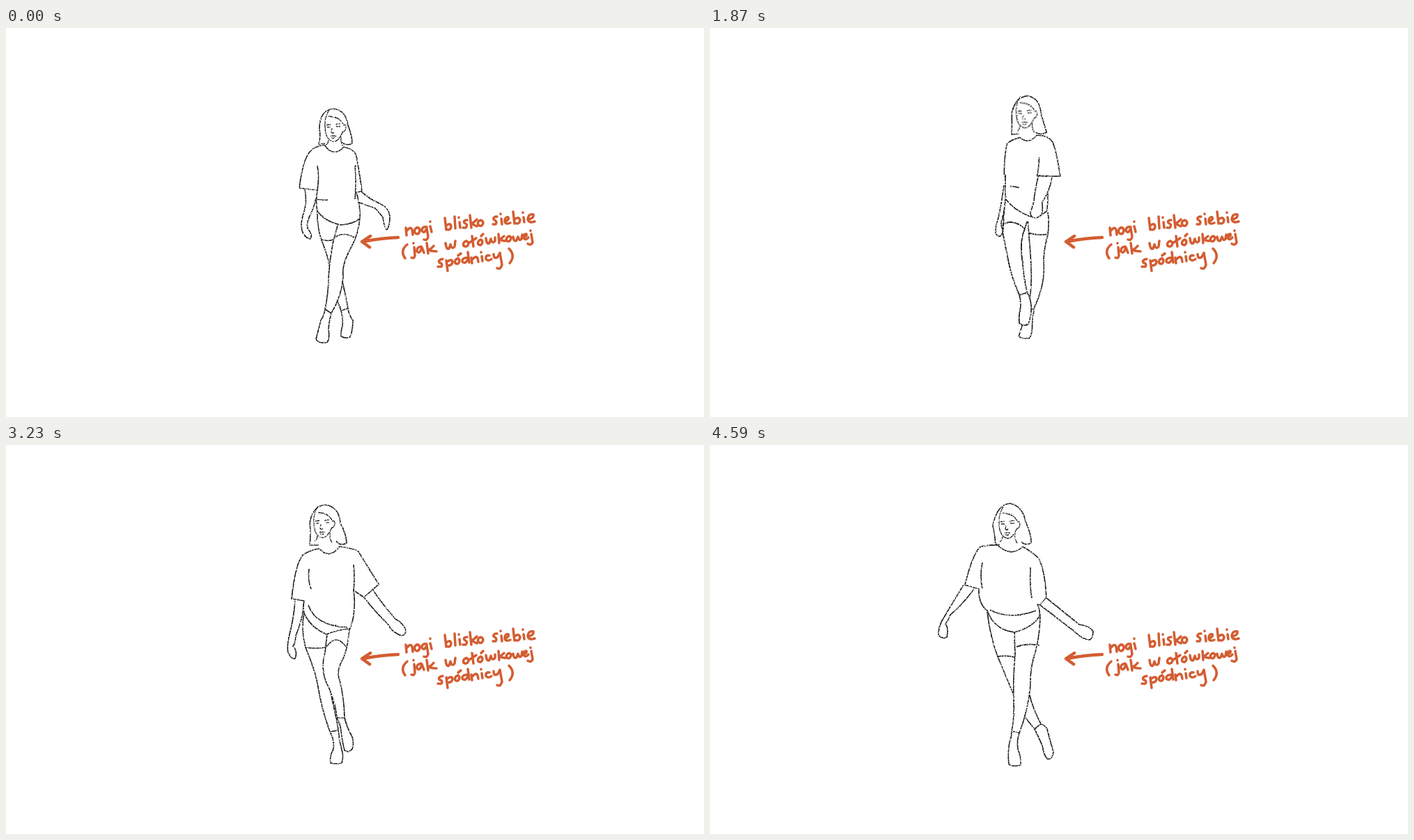
An HTML page without scripts that plays this animation: 1002x559 px, repeating every 4.76 s.

```html
<!DOCTYPE html>
<html lang="pl">
<head>
<meta charset="utf-8">
<title>Chód</title>
<style>
html, body { margin: 0; height: 100%; overflow: hidden; background: #fff; }
svg { display: block; width: 100vw; height: 100vh; }
.figure { fill: #fff; stroke: #161616; stroke-width: 1.7; stroke-linejoin: round; }
.figure .part { animation: 4.76s infinite; }
.line { fill: none; }
.ink { fill: none; stroke: #d35d32; stroke-width: 3.5; stroke-linecap: round; stroke-linejoin: round; }

/* Key poses; steps() holds each drawing for 170 ms */
.part.torso { animation-name: torso; }
.part.folds { animation-name: folds; }
.part.leg-r { animation-name: leg-r; }
.part.leg-l { animation-name: leg-l; }
.part.foot-r { animation-name: foot-r; }
.part.foot-l { animation-name: foot-l; }
.part.arm-r { animation-name: arm-r; }
.part.arm-l { animation-name: arm-l; }
.part.hair { animation-name: hair; }
.part.face { animation-name: face; }
.front { animation: swap 4.76s step-end infinite; }

@keyframes swap {
  0%, 60.714%, to { visibility: hidden; }
  28.571% { visibility: visible; }
}
@keyframes torso {
  0% { animation-timing-function: steps(4); d: path("M457 168Q442 170 436 178Q426 190 421 230L447 233Q444 250 447 263Q456 277 480 283Q498 282 508 274Q509 256 503 236L503 237L511 234Q506 200 503 184Q500 174 485 171Q470 187 457 168"); }
  14.285% { animation-timing-function: steps(4); d: path("M449 164Q432 163 425 168Q412 185 403 221L421 225Q430 238 432 257Q442 270 464 273Q486 270 496 254Q496 244 491 235L495 233L506 230Q502 190 495 178Q490 172 477 167Q462 177 449 164"); }
  28.571% { animation-timing-function: steps(7); d: path("M441 154Q426 155 422 161Q416 180 415 213L418 214Q421 232 421 247Q434 261 460 268Q474 267 479 260Q475 240 465 221L463 221L499 220Q494 175 486 168Q480 159 469 156Q454 169 441 154"); }
  53.571% { animation-timing-function: steps(4); d: path("M450 162Q438 169 432 174Q431 190 432 206L432 220Q427 230 428 243Q438 262 456 274Q476 276 489 268Q504 248 504 205L478 201L508 204Q501 175 499 158Q493 147 469 152Q462 167 450 162"); }
  67.857% { animation-timing-function: steps(5); d: path("M450 149Q436 151 426 158Q415 172 410 221L428 224Q425 236 430 246Q440 264 460 272Q478 265 494 264Q503 240 499 209L514 219L535 200Q515 168 505 152Q495 148 479 146Q464 165 450 149"); }
  85.714% { animation-timing-function: steps(3); d: path("M432 145Q412 145 404 152Q393 170 389 214L411 217Q412 228 421 238Q430 262 456 270Q478 264 493 248Q488 232 485 213L486 214L495 214Q495 165 488 154Q478 149 463 144Q447 162 432 145"); }
  96.428%, to { d: path("M413 144Q396 143 387 147Q376 160 366 201L386 207Q385 228 398 238Q408 266 437 269Q462 263 473 246Q474 238 470 229L474 230L483 219Q480 175 471 162Q464 155 449 146Q432 162 413 144"); }
}
@keyframes folds {
  0% { animation-timing-function: steps(4); d: path("M447 198Q450 215 447 233M501 197Q503 220 501 246M446 246Q454 248 462 247"); }
  14.285% { animation-timing-function: steps(4); d: path("M425 195Q430 205 421 225M487 192Q484 210 491 235M480 206Q483 212 480 219"); }
  28.571% { animation-timing-function: steps(7); d: path("M418 214Q418 214 418 214M468 190Q468 205 463 221M430 232Q430 232 430 232"); }
  53.571% { animation-timing-function: steps(4); d: path("M432 206Q432 213 432 220M478 180Q479 190 478 201M432 222Q445 221 462 226"); }
  67.857% { animation-timing-function: steps(5); d: path("M435 178Q433 195 438 207M499 172Q501 190 499 209M434 230Q444 260 490 262"); }
  85.714% { animation-timing-function: steps(3); d: path("M408 172Q411 195 411 217M474 170Q473 190 481 204M424 238Q450 260 491 236"); }
  96.428%, to { d: path("M391 169Q387 188 391 207M460 176Q459 205 462 220M402 237Q430 252 468 238"); }
}
@keyframes leg-r {
  0% { animation-timing-function: steps(4); d: path("M508 272Q507 295 494 318Q482 340 484 358Q482 385 467 410L458 404Q463 380 463 358Q465 330 470 306L476 284M472 301Q484 292 500 301"); }
  14.285% { animation-timing-function: steps(4); d: path("M496 252Q497 275 492 295Q484 320 487 338Q483 385 468 408L455 403Q461 385 461 360Q460 330 463 302L464 272M464 293Q478 291 492 293"); }
  28.571% { animation-timing-function: steps(7); d: path("M482 262Q487 275 486 292Q480 318 481 342Q483 372 466 404L456 402Q460 385 460 362Q462 345 458 308L455 279M457 291Q470 292 486 291"); }
  53.571% { animation-timing-function: steps(4); d: path("M489 268Q488 290 483 306Q475 325 477 346Q476 372 462 405L456 399Q463 380 463 355Q460 320 459 302L458 276M460 300Q472 307 485 303"); }
  67.857% { animation-timing-function: steps(5); d: path("M493 262Q492 285 485 305Q473 325 479 338Q485 360 486 392L475 392Q474 375 464 350Q450 325 458 298L461 272M460 290Q474 270 488 290"); }
  85.714% { animation-timing-function: steps(3); d: path("M489 250Q491 275 483 296Q470 322 468 345Q463 380 444 415L432 410Q439 390 441 360Q444 335 450 310L453 269M454 289Q466 283 485 290"); }
  96.428%, to { d: path("M474 243Q474 270 468 294Q459 320 460 345Q457 380 444 414L433 411Q437 395 436 365Q435 330 438 302L437 268M440 290Q456 284 473 288"); }
}
@keyframes leg-l {
  0% { animation-timing-function: steps(4); d: path("M447 262Q446 285 453 305Q463 330 465 345Q470 380 481 406L491 403Q488 385 483 365Q480 340 474 306L476 284M453 304Q462 307 471 304"); }
  14.285% { animation-timing-function: steps(4); d: path("M431 257Q434 285 440 303Q451 330 453 346Q458 380 470 402L481 397Q475 385 473 365Q472 335 463 303L464 272M440 303Q452 306 463 302"); }
  28.571% { animation-timing-function: steps(7); d: path("M421 249Q419 275 415 298Q414 318 419 332Q424 348 428 364L440 360Q437 345 436 326Q434 305 441 294L453 280M419 273Q434 264 449 290"); }
  53.571% { animation-timing-function: steps(4); d: path("M428 243Q424 270 428 292Q441 325 442 342Q444 370 466 410L476 407Q468 380 466 355Q459 325 459 302L458 276M427 292Q442 287 459 290"); }
  67.857% { animation-timing-function: steps(5); d: path("M428 240Q423 265 430 291Q443 322 447 342Q453 380 465 412L477 410Q476 400 468 365Q462 335 459 306L461 272M430 291Q444 293 458 291"); }
  85.714% { animation-timing-function: steps(3); d: path("M421 240Q421 270 430 298Q440 325 448 345Q456 375 474 409L484 403Q478 380 470 355Q462 330 452 300L453 269M430 298Q440 300 452 297"); }
  96.428%, to { d: path("M398 240Q402 275 413 304Q428 340 435 357Q445 385 466 408L475 401Q464 380 459 360Q450 330 438 303L437 268M413 304Q425 302 438 305"); }
}
@keyframes foot-r {
  0% { animation-timing-function: steps(4); d: path("M458 404Q457 413 452 420Q448 436 445 447Q448 454 461 452Q465 447 463 433Q464 420 467 410"); }
  14.285% { animation-timing-function: steps(4); d: path("M455 403Q453 412 451 419Q446 436 443 445Q446 449 459 448Q463 440 463 425Q466 415 467 408"); }
  28.571% { animation-timing-function: steps(7); d: path("M456 402Q453 412 452 418Q447 434 442 443Q446 446 459 445Q463 436 463 424Q463 414 466 404"); }
  53.571% { animation-timing-function: steps(4); d: path("M456 399Q453 408 450 416Q446 432 445 443Q450 449 458 447Q463 442 462 432Q461 420 464 408"); }
  67.857% { animation-timing-function: steps(5); d: path("M475 392Q480 402 481 411Q483 428 486 439Q492 443 497 437Q500 430 497 419Q490 408 486 392"); }
  85.714% { animation-timing-function: steps(3); d: path("M432 410Q430 416 424 424Q421 440 425 459Q430 464 439 461Q442 453 437 443Q437 428 444 415"); }
  96.428%, to { d: path("M433 411Q433 420 430 427Q427 442 429 459Q436 463 446 460Q447 450 442 437Q440 425 444 414"); }
}
@keyframes foot-l {
  0% { animation-timing-function: steps(4); d: path("M481 406Q484 418 483 428Q480 437 481 443Q487 447 494 444Q498 434 498 420Q492 412 491 403"); }
  14.285% { animation-timing-function: steps(4); d: path("M470 402Q477 412 477 424Q478 434 481 440Q487 443 492 438Q495 430 490 416Q487 405 481 397"); }
  28.571% { animation-timing-function: steps(7); d: path("M428 364Q432 378 429 389Q427 397 430 404Q436 409 441 405Q445 395 445 380Q446 370 440 360"); }
  53.571% { animation-timing-function: steps(4); d: path("M466 410Q467 420 467 428Q464 440 463 451Q468 456 478 454Q483 442 483 428Q480 416 476 407"); }
  67.857% { animation-timing-function: steps(5); d: path("M465 412Q472 424 470 437Q464 448 466 457Q474 459 482 457Q485 448 482 438Q478 424 477 410"); }
  85.714% { animation-timing-function: steps(3); d: path("M474 409Q480 422 479 433Q474 443 474 450Q480 454 489 451Q493 440 492 425Q484 412 484 403"); }
  96.428%, to { d: path("M466 408Q472 420 477 432Q479 445 484 451Q491 453 493 441Q488 425 484 408Q480 402 475 401"); }
}
@keyframes arm-r {
  0% { animation-timing-function: steps(4); d: path("M510 235Q522 246 538 253Q549 258 551 270Q551 284 547 290Q543 288 541 272Q536 266 530 259Q515 254 505 250"); }
  14.285% { animation-timing-function: steps(4); d: path("M498 230Q525 235 549 235Q564 238 571 253Q571 258 565 256Q560 248 554 249Q558 246 550 243Q520 244 496 243"); }
  28.571% { animation-timing-function: steps(7); d: path("M483 222Q487 238 487 251Q492 260 491 267Q488 272 482 271Q476 268 479 262Q481 256 478 250Q469 240 466 222"); }
  53.571% { animation-timing-function: steps(4); d: path("M501 204Q490 228 463 250Q460 263 456 270Q448 277 438 274Q434 266 437 261Q441 254 447 249Q463 224 478 202"); }
  67.857% { animation-timing-function: steps(5); d: path("M527 209Q543 232 559 250Q570 256 574 266Q574 273 568 274Q556 270 551 262Q549 258 547 256Q530 240 514 219"); }
  85.714% { animation-timing-function: steps(3); d: path("M493 252Q495 270 500 276Q505 288 502 300Q497 305 492 303Q485 299 487 290Q491 280 493 278Q492 270 491 262"); }
  96.428%, to { d: path("M483 220Q508 240 530 258Q546 260 550 268Q550 277 545 280Q533 278 528 272Q525 270 522 267Q500 250 474 230"); }
}
@keyframes arm-l {
  0% { animation-timing-function: steps(4); d: path("M429 232Q433 252 426 270Q422 284 426 294Q431 303 437 303Q441 298 433 288Q431 280 436 270Q444 255 447 234"); }
  14.285% { animation-timing-function: steps(4); d: path("M408 224Q400 248 388 263Q382 278 385 287Q389 293 393 291Q389 284 393 274Q399 270 398 264Q409 246 420 227"); }
  28.571% { animation-timing-function: steps(7); d: path("M417 213Q418 240 406 266Q401 278 402 286Q405 293 410 290Q414 284 411 276Q410 268 414 264Q421 252 421 246"); }
  53.571% { animation-timing-function: steps(4); d: path("M428 243Q421 262 423 288Q420 298 421 306Q424 313 428 310Q433 304 429 300Q427 294 426 290Q428 262 429 245"); }
  67.857% { animation-timing-function: steps(5); d: path("M415 224Q413 250 407 272Q403 288 405 298Q409 308 415 307Q419 296 412 289Q416 283 416 274Q426 250 428 226"); }
  85.714% { animation-timing-function: steps(3); d: path("M392 215Q392 245 387 268Q382 285 385 293Q391 302 398 301Q400 292 393 284Q397 276 394 268Q407 240 410 217"); }
  96.428%, to { d: path("M364 201Q350 224 335 249Q327 262 328 273Q334 280 340 276Q343 264 338 257Q342 252 345 244Q362 230 379 207"); }
}
@keyframes hair {
  0% { animation-timing-function: steps(4); d: path("M458 166L449 167Q452 155 450 145Q450 118 470 116Q488 118 491 140Q497 155 497 166Q488 170 482 164"); }
  14.285% { animation-timing-function: steps(4); d: path("M449 161L440 163Q443 148 440 138Q443 112 463 110Q480 112 483 136Q491 154 485 162Q476 165 473 156"); }
  28.571% { animation-timing-function: steps(7); d: path("M441 152L434 153Q434 140 435 122Q440 100 458 99Q475 102 476 126Q482 142 481 153Q474 156 467 151"); }
  53.571% { animation-timing-function: steps(4); d: path("M447 152L432 153Q433 140 431 122Q436 97 455 96Q472 99 474 120Q478 136 486 146Q478 152 468 149"); }
  67.857% { animation-timing-function: steps(5); d: path("M449 144L436 144Q438 125 436 112Q440 87 459 86Q478 89 480 112Q489 130 489 141Q480 146 474 138"); }
  85.714% { animation-timing-function: steps(3); d: path("M432 143L421 146Q422 128 421 112Q424 84 447 82Q464 85 467 110Q477 130 475 141Q464 144 459 137"); }
  96.428%, to { d: path("M416 143L410 143Q409 130 406 116Q412 85 431 84Q449 88 453 110Q462 130 461 141Q452 145 447 139"); }
}
@keyframes face {
  0% { animation-timing-function: steps(4); transform: none; }
  14.285% { animation-timing-function: steps(4); transform: translate(-9.5px, -8px); }
  28.571% { animation-timing-function: steps(7); transform: translate(-17px, -19px); }
  53.571% { animation-timing-function: steps(4); transform: translate(-20px, -20.5px); }
  67.857% { animation-timing-function: steps(5); transform: translate(-16px, -30px); }
  85.714% { animation-timing-function: steps(3); transform: translate(-28.5px, -32px); }
  96.428%, to { transform: translate(-43px, -29px); }
}
</style>
</head>
<body>
<svg viewBox="0 0 1002 559">
  <filter id="pencil" filterUnits="userSpaceOnUse" x="300" y="60" width="300" height="420" color-interpolation-filters="sRGB">
    <feTurbulence type="fractalNoise" baseFrequency=".55" numOctaves="2" seed="4" result="noise"/>
    <feDisplacementMap in="SourceGraphic" in2="noise" scale="1.6" xChannelSelector="R" yChannelSelector="G" result="rough"/>
    <feColorMatrix in="noise" values="0 0 0 0 1  0 0 0 0 1  0 0 0 0 1  5 0 0 0 -2.5" result="grain"/>
    <feComposite in="grain" in2="rough" operator="atop"/>
  </filter>

  <g class="figure" filter="url(#pencil)">
    <path class="part arm-l"/>
    <path class="part foot-l"/>
    <path class="part leg-l"/>
    <path class="part foot-r"/>
    <path class="part leg-r"/>
    <g class="front">
      <path class="part foot-l"/>
      <path class="part leg-l"/>
    </g>
    <path class="part torso"/>
    <path class="part folds line"/>
    <path class="part arm-r"/>
    <path class="part hair"/>
    <g class="part face line" stroke-width="1.3">
      <path d="M464 118Q457 128 458 142Q458 156 465 161Q471 166 477 160Q482 154 484 148M463 127Q478 127 484 138M484 140Q488 137 488 143Q487 149 484 149"/>
      <path d="M463 160Q463 166 459 168M481 156Q480 165 484 170"/>
      <path d="M461 142.500h5M474 141.500h6M460 139.500l6-1M473 139q4-2 7-1M468 144l-1 6q2 2 4 0M466 155.500q4-1 8 0M467 157.500q3 2 5 0"/>
    </g>
  </g>

  <g class="ink" role="img" aria-label="nogi blisko siebie (jak w ołówkowej spódnicy)">
    <path stroke-width="4.500" d="M512 307Q538 302 563 301M523 299L511 307L522 315"/>
    <path d="M574 287L575 298M575 292Q581 284 583 290L584 297M591 287Q585 288 587 294Q591 299 594 292Q594 286 589 287M604 286Q597 285 597 291Q600 297 604 288L606 300Q605 306 600 304M609 285L611 293M609 278v.5"/>
    <path d="M630 273L632 290M632 284Q638 279 639 285Q638 292 632 289M644 271L645 288M651 279L652 287M650 272v.5M662 276Q656 276 658 280Q664 283 660 287L656 287M666 269L668 287M676 275Q671 280 668 281Q672 283 676 285M681 276Q676 278 678 283Q683 287 685 280Q684 275 680 277"/>
    <path d="M705 271Q699 271 700 275Q706 278 703 282L699 282M711 274L712 282M710 267v.5M716 278Q723 276 721 272Q716 271 716 278Q717 283 724 280M728 264L730 281M730 275Q736 270 738 276Q737 283 730 280M743 272L744 279M742 265v.5M749 275Q758 274 757 268Q750 266 749 275Q751 281 759 278"/>
    <path d="M576 311Q565 320 573 331M586 315L587 327Q586 332 582 330M585 309v.5M596 314Q589 315 590 321Q594 326 597 315L600 323M604 309L606 324M614 313Q610 318 606 319Q612 321 618 321M631 309Q632 319 636 317L638 311Q640 319 644 314L645 306"/>
    <path d="M661 306Q655 308 657 313Q662 316 664 310Q663 305 659 307M669 299L671 314M666 308L675 302M682 304Q676 306 678 311Q683 314 684 307Q683 303 680 305M682 299L685 296M689 302Q690 312 694 309L696 303Q698 311 702 306L702 301"/>
    <path d="M707 296L708 309M715 299L709 304Q713 306 717 306M722 299Q717 301 719 306Q724 308 725 302Q724 298 721 300M728 300Q729 308 733 305L735 300Q737 307 740 303L741 297M743 301Q749 299 747 296Q742 296 743 302Q746 306 750 301M754 296L756 308Q754 313 749 310M753 291v.5"/>
    <path d="M627 332Q620 333 622 337Q628 339 625 343L620 343M632 334L634 349M633 336Q640 331 641 336Q640 342 634 341M649 331Q643 333 645 338Q650 341 651 334Q650 330 647 332M649 327L653 324M661 330Q654 331 655 336Q660 340 663 332M663 322L665 337"/>
    <path d="M668 330L669 338M669 333Q675 326 677 331L678 336M683 328L684 335M682 322v.5M694 327Q688 326 689 332Q692 336 697 332M700 325Q700 333 706 329L709 323L712 340Q710 348 705 345M722 317Q732 327 723 338"/>
  </g>
</svg>
</body>
</html>
```
